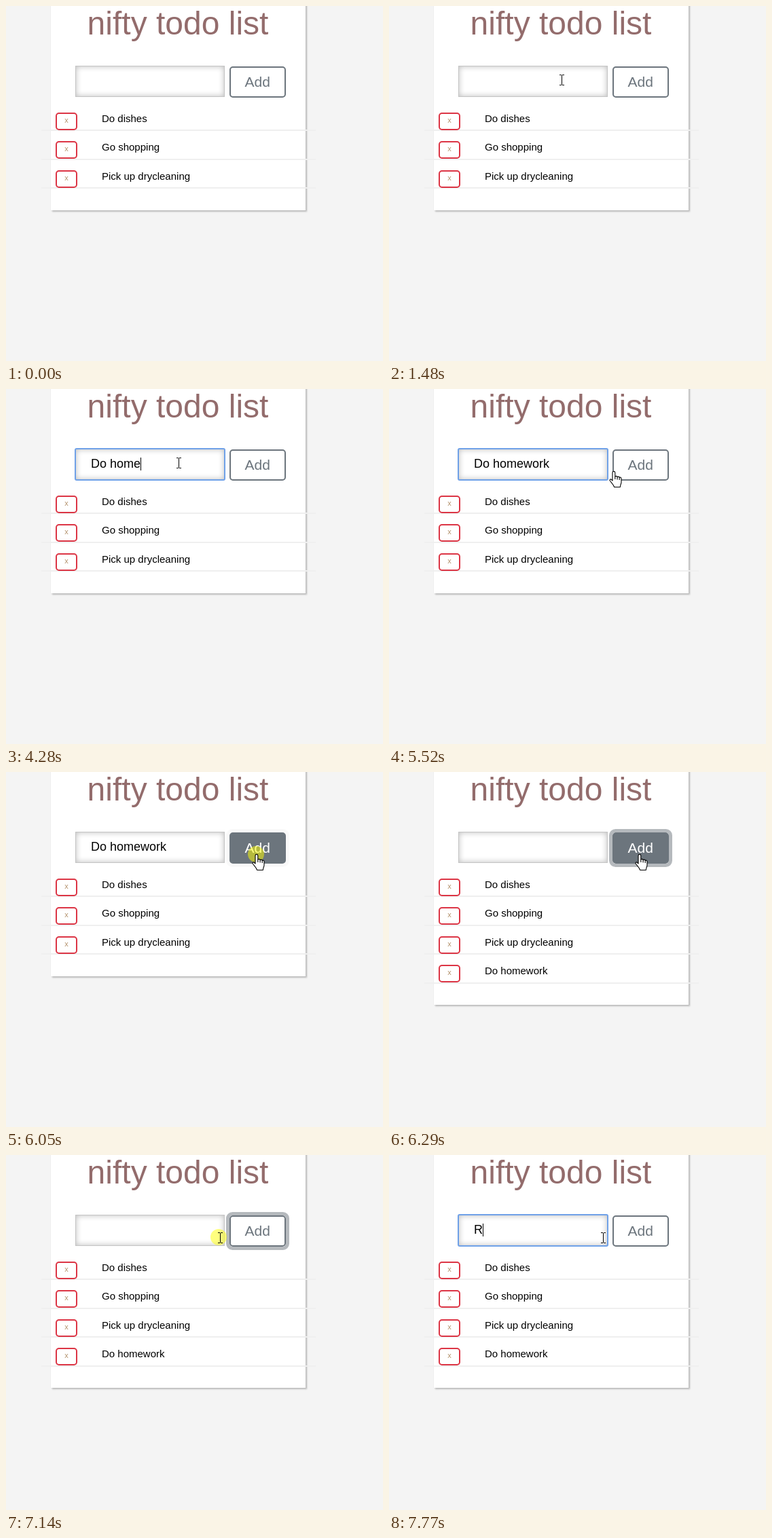
These frames come from a looping animation (555 by 523 pixels, 8 s). An HTML page:

```html
<!DOCTYPE html>
<html lang="en">
<head>
<meta charset="utf-8">
<title>Todo list</title>
<style>
  html, body { margin: 0; width: 100%; height: 100%; overflow: hidden; background: #f4f4f4; }
  div, svg { position: absolute; box-sizing: border-box; }
  svg { left: 0; top: 0; font-family: "Liberation Sans", Arial, sans-serif; }
  #card { left: 66px; top: -20px; width: 375px; background: #fff; box-shadow: 2px 2px 2px #bbb, 0 0 1px #ccc; }
  #field { left: 102px; top: 88px; width: 220px; height: 46px; background: #fff;
    border: 1px solid #c4c4c4; box-shadow: inset 0 0 8px #bbb; }
  #field.focus { outline: 2px solid #6fa1e8; outline-offset: -1px; border-radius: 2px; }
</style>
</head>
<body>
<div id="card"></div>
<div id="field"></div>
<svg width="555" height="523" viewBox="0 0 555 523">
  <text x="253" y="42" font-size="48" text-anchor="middle" fill="#936c6c">nifty todo list</text>
  <g id="rows"></g>
  <text id="typed" x="125" y="116" font-size="18"></text>
  <rect id="caret" y="101" width="1" height="19"/>
  <rect id="ring" x="326.5" y="86.5" width="88" height="51" rx="7" fill="none" stroke="#6c757d" stroke-width="5"/>
  <rect id="button" x="330" y="90" width="81" height="44" rx="4" fill="#6c757d" stroke="#6c757d" stroke-width="2"/>
  <text id="label" x="370.3" y="119" font-size="21" text-anchor="middle">Add</text>
  <circle id="click" r="12" fill="#ff0" fill-opacity=".5"/>
  <g id="pointer">
    <path id="arrow" d="M.5.5V16.5L4 13l2.5 5.5 2.5-1L6.500 12H11.500Z" fill="#fff" stroke="#000"/>
    <path id="beam" d="M-1 -6.500H2M3 -6.500H6M2.500 -6V8M-1 8.500H2M3 8.500H6" fill="none" stroke="#000"/>
    <g id="hand" fill="#fff" stroke="#000" stroke-width="1.1" stroke-linejoin="round">
      <path d="M-1 14V2.300a1.900 1.900 0 0 1 3.800 0V8c1-1 3-.8 3.300.6 1-.9 2.800-.6 3.100.8 1.200-.7 2.800 0 2.800 1.700V16c0 3-1.700 4-1.700 7.500H1.500C1 20.500-2 18-4.700 14.300c-1-1.500.6-3 2-2Z"/>
      <path d="M2.800 8v4M6.100 8.600V12.500M9.200 9.400V13" fill="none"/>
    </g>
  </g>
</svg>
<script>
const LOOP = 8000, TICK = 77.65;
const $ = id => document.getElementById(id);
const set = (id, attrs) => { for (const k in attrs) $(id).setAttribute(k, attrs[k]); };
const show = (id, on) => set(id, { visibility: on ? "visible" : "hidden" });
const clamp = v => Math.max(0, Math.min(1, v));
const ramp = (t, start) => clamp((t - start) / 150);
const within = (t, a, b) => t >= a && t < b;

const tasks = ["Do dishes", "Go shopping", "Pick up drycleaning", "Do homework"];
$("rows").innerHTML = tasks.map((task, i) => {
  const y = base => Math.round(base + 42.4 * i);
  return `<g id="row${i}">
    <rect x="52" y="${y(182.4)}" width="404" height="2" fill="#efefef"/>
    <rect x="74" y="${y(157) + 1}" width="30" height="24" rx="4" fill="#fff" stroke="#dc3545" stroke-width="2"/>
    <text x="89" y="${y(172)}" font-size="11" text-anchor="middle" fill="#b5946f">x</text>
    <text x="141" y="${y(171)}" font-size="15">${task}</text></g>`;
}).join("");

// Text changes as [time, number of letters], starting with the click into the field.
const homework = [[1940, 0], [2720, 1], [2950, 2], [3100, 3], [3260, 4], [3410, 5],
  [3560, 6], [3880, 7], [4280, 8], [4430, 9], [4660, 10], [4830, 11]];
const keys = [...homework.map(([at, n]) => [at, tasks[3].slice(0, n)]),
  [6210, ""], [7190, ""], [7770, "R"]];

// Pointer hotspot as [time, x, y].
const path = [[230, 359, 242], [390, 310, 180], [540, 262, 116], [620, 252, 106], [1470, 252, 106],
  [1480, 252, 108], [5290, 252, 108], [5520, 330, 121], [5750, 368, 121], [6600, 368, 121],
  [6750, 315, 121], [6910, 313, 121], [LOOP, 313, 121]];
const clicks = [[1860, 2090], [6050, 6290], [7140, 7380]];

function pointerAt(t) {
  const i = Math.max(1, path.findIndex(p => p[0] >= t));
  const [a, b] = [path[i - 1], path[i]];
  const u = clamp((t - a[0]) / (b[0] - a[0]));
  return [1, 2].map(k => Math.round(a[k] + (b[k] - a[k]) * u));
}

function draw(t) {
  const added = t >= 6210;
  $("card").style.height = (added ? 363 : 321) + "px";
  show("row3", added);

  const focused = within(t, 1940, 6050) || t >= 7190;
  $("field").className = focused ? "focus" : "";
  const [since, text] = keys.filter(k => k[0] <= t).pop() || [0, ""];
  $("typed").textContent = text.replace(/ /g, "\u00a0");
  show("caret", focused && (t - since) % 1040 < 520);
  set("caret", { x: Math.round(125 + (text ? $("typed").getComputedTextLength() : 0)) });

  const hover = ramp(t, 5520) - ramp(t, 6730);
  const mix = (a, b) => Math.round(a + (b - a) * hover);
  set("button", { "fill-opacity": hover });
  set("label", { fill: `rgb(${mix(108, 255)},${mix(117, 255)},${mix(125, 255)})` });
  set("ring", { "stroke-opacity": (ramp(t, 6050) - ramp(t, 7190)) / 2 });

  const [x, y] = pointerAt(t);
  const overButton = within(x, 329, 412) && within(y, 89, 135);
  const overField = within(x, 102, 322) && within(y, 88, 134);
  const present = t >= 230;
  set("pointer", { transform: `translate(${x} ${y})` });
  show("hand", present && overButton);
  show("beam", present && overField);
  show("arrow", present && !overButton && !overField);
  set("click", { cx: x, cy: y });
  show("click", clicks.some(([a, b]) => within(t, a, b)));
}

function frame() {
  const now = performance.now() % LOOP;
  draw(Math.floor((now + 8) / TICK) * TICK + 6);
  requestAnimationFrame(frame);
}
frame();
</script>
</body>
</html>
```
